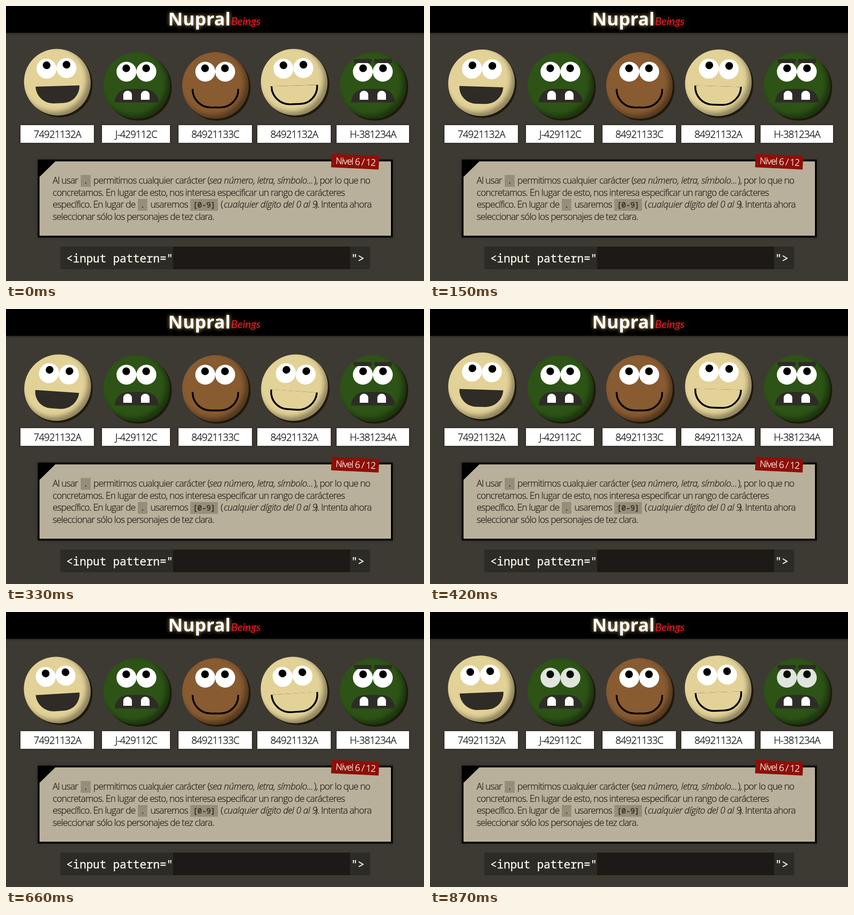
These frames come from a looping animation (923x607 px, 0.9 s). An HTML page:

```html
<!DOCTYPE html>
<html lang="es">
<head>
<meta charset="utf-8">
<style>
  html, body { margin: 0; width: 100%; height: 100%; overflow: hidden; background: #3d3a33; }
  body * { position: absolute; box-sizing: border-box; }
  header { width: 100%; height: 59px; background: #000; box-shadow: 0 1px 5px #1a1814; }
  svg { left: 0; top: 0; }
  .face {
    top: 102px; width: 147px; height: 147px; border-radius: 50%;
    transform-origin: 50% 53%;
    box-shadow: 4px 4px 1px #1e190b, inset -8px -8px 11px rgba(0, 0, 0, .38);
  }
  .cream { background: #e3d297; }
  .green { background: #2d5416; }
  .brown { background: #885b31; }
  .eye { top: 21px; width: 44px; height: 44px; border-radius: 50%; background: #fff; }
  .eye::after {
    content: ""; position: absolute; left: 13.5px; top: 6px;
    width: 17px; height: 17px; border-radius: 50%; background: #000;
  }
  .eye.l { left: 29px; }
  .eye.r { left: 73px; }
  .laugh { left: 25px; top: 82px; width: 97px; height: 38px; border-radius: 0 0 38px 38px; background: #2f2c27; }
  .smile {
    left: 21px; top: 77px; width: 105px; height: 47px;
    border: 4px solid #000; border-radius: 0 0 42px 42px; clip-path: inset(4px 0 0);
  }
  .growl { left: 25px; top: 81px; width: 97px; height: 30px; border-radius: 30px 30px 0 0; background: #2f2c27; }
  .tooth { top: 4px; width: 19px; height: 20px; border-radius: 9px 9px 0 0; background: #fff; }
  .brow { top: 15px; width: 39px; height: 9px; background: #2f2c27; }
  .label { top: 262.5px; height: 39.5px; background: #fff; box-shadow: 0 0 5px #25221d; }
  .card { left: 70px; top: 339px; width: 784px; height: 172px; border: 4px solid #000; background: #b8b09a; box-shadow: 0 0 5px #2b2823; }
  .bar { left: 120px; top: 531px; width: 684px; height: 50px; background: #2d2b26; }
  .field { left: 249px; width: 391px; height: 50px; background: #1c1916; }
  text { font-family: "Open Sans", "Noto Sans", sans-serif; font-weight: 300; white-space: pre; stroke-width: .4px; }
  .id { font-size: 22px; letter-spacing: -1px; fill: #111; stroke: #111; }
  .copy text { font-size: 20.4px; letter-spacing: -.94px; fill: #2f2a22; stroke: #2f2a22; }
  .copy tspan { font-style: italic; letter-spacing: -.5px; }
  .copy .code, .tag { font-family: "Noto Sans Mono", "DejaVu Sans Mono", monospace; font-weight: 400; letter-spacing: 0; }
  .copy .code { font-size: 16.4px; }
  .tag { font-size: 24.6px; fill: #fbf7ea; stroke: #fbf7ea; }
  .name { font-size: 40px; font-weight: 700; fill: #fff; text-shadow: 0 0 9px #c9a868; }
  .sub { font: italic 400 24px Lato, sans-serif; fill: #e0202a; text-shadow: 0 0 7px #8a2a18; }
  .level { font-size: 20px; letter-spacing: -1.05px; fill: #fff6ee; stroke: #fff6ee; }
</style>
</head>
<body>
<header></header>
<div id="people"></div>
<div class="card"></div>
<div class="bar"><div class="field"></div></div>
<svg width="923" height="607">
  <text class="name" x="358" y="43">Nupral</text>
  <text class="sub" x="497" y="42">Beings</text>
  <g id="ids"></g>
  <path d="M70 339H113L70 381Z"/>
  <g fill="#968e78">
    <rect x="165" y="373" width="22" height="26"/>
    <rect x="291" y="426" width="21" height="26"/>
    <rect x="407" y="426" width="61" height="26"/>
  </g>
  <g class="copy">
    <text x="103" y="392">Al usar</text>
    <text class="code" x="171" y="392">.</text>
    <text x="193" y="392">permitimos cualquier carácter (<tspan x="449">sea número, letra, símbolo...</tspan></text>
    <text x="680" y="392">), por lo que no</text>
    <text x="103" y="418.5">concretamos. En lugar de esto, nos interesa especificar un rango de carácteres</text>
    <text x="103" y="445">específico. En lugar de</text>
    <text class="code" x="297" y="445">.</text>
    <text x="319" y="445">usaremos</text>
    <text class="code" x="413" y="445">[0-9]</text>
    <text x="474" y="445">(<tspan x="481">cualquier dígito del 0 al 9</tspan></text>
    <text x="683" y="445">). Intenta ahora</text>
    <text x="103" y="471.5">seleccionar sólo los personajes de tez clara.</text>
  </g>
  <g transform="translate(771 343.5) rotate(2.8)">
    <rect x="-52.5" y="-15" width="105" height="30" fill="#8c1007"/>
    <text class="level" x="-43" y="7">Nivel 6 / 12</text>
  </g>
  <text class="tag" x="133" y="566">&lt;input pattern="</text>
  <text class="tag" x="762" y="566">"&gt;</text>
</svg>
<script>
  const part = (name, left) =>
    `<div class="${name}"${left === undefined ? "" : ` style="left:${left}px"`}></div>`;
  const growl = `<div class="growl">${part("tooth", 19)}${part("tooth", 58)}</div>`;
  const brows = part("brow", 31) + part("brow", 76);

  // skin, face x, features, label x, label width, label text
  const people = [
    ["cream", 40.3, part("laugh"), 32, 162, "74921132A"],
    ["green", 214.6, growl, 212, 150, "J-429112C"],
    ["brown", 388.5, part("smile"), 380.5, 162, "84921133C"],
    ["cream", 562.8, part("smile"), 555, 162, "84921132A"],
    ["green", 737, growl + brows, 730, 160, "H-381234A"],
  ];
  const html = people.map(([skin, x, features, labelX, width]) =>
    `<div class="face ${skin}" style="left:${x}px">${part("eye l")}${part("eye r")}${features}</div>
     <div class="label" style="left:${labelX}px;width:${width}px"></div>`);
  document.getElementById("people").innerHTML = html.join("");
  document.getElementById("ids").innerHTML = people.map(([, , , x, , id]) =>
    `<text class="id" x="${x + 29}" y="291">${id}</text>`).join("");

  const LOOP = 900, STEP = 30;
  const dancers = document.querySelectorAll(".cream");
  const blinkers = document.querySelectorAll(".green .eye");
  const triangle = phase => Math.asin(Math.sin(phase * 2 * Math.PI)) * 2 / Math.PI;

  function draw(now) {
    const t = Math.floor(now % LOOP / STEP) * STEP;
    const sway = triangle((t - 60) / LOOP);
    const lift = 1 - Math.abs(sway);
    const tilt = 5 * sway - .5 * lift;
    for (const face of dancers)
      face.style.transform = `translateY(${-10 * lift}px) rotate(${tilt}deg) skewX(${-3 * sway}deg)`;
    for (const eye of blinkers)
      eye.style.opacity = 1 - Math.max(0, t - 810) / 60 * .15;
    requestAnimationFrame(draw);
  }
  draw(performance.now());
</script>
</body>
</html>
```
